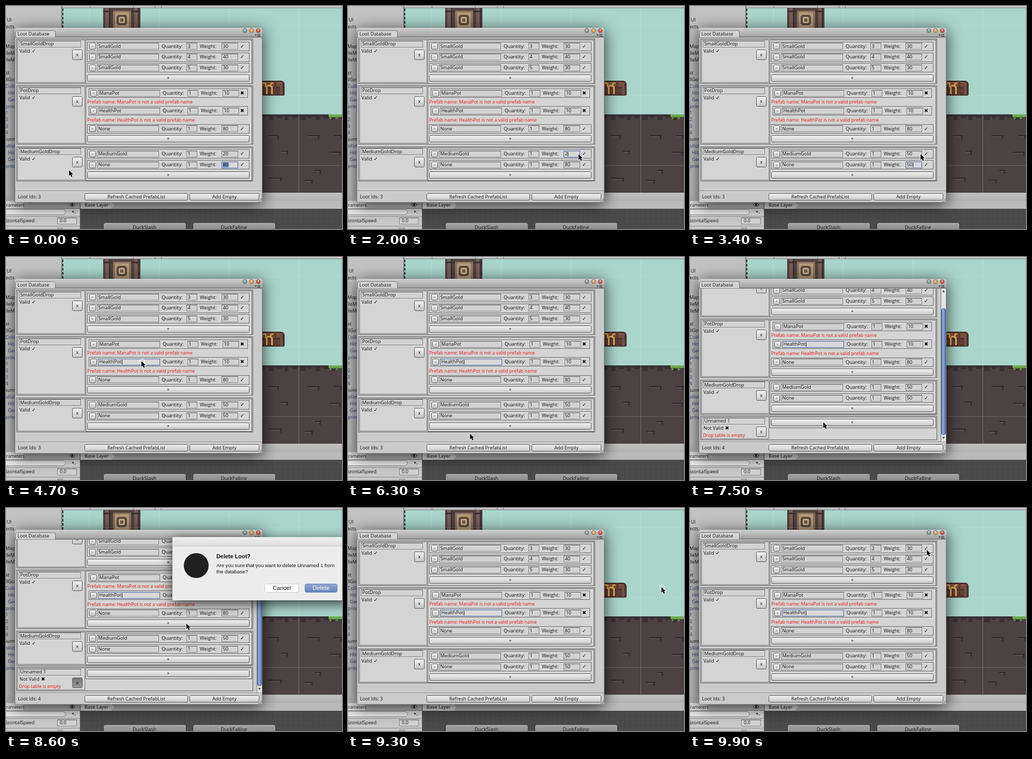
An HTML page with a canvas that plays this animation: 650 px wide and 430 px high, repeating every 10000 ms.

```html
<!DOCTYPE html>
<html>
<head>
<meta charset="utf-8">
<style>
html, body { margin: 0; width: 650px; height: 430px; overflow: hidden; }
canvas { display: block; }
</style>
</head>
<body>
<canvas id="stage" width="650" height="430"></canvas>
<script>
const c = document.getElementById('stage').getContext('2d');
const UI = '"Open Sans", sans-serif', MARK = '"DejaVu Sans", sans-serif', SYS = '"Liberation Sans", Arial, sans-serif';
const RED = '#ea1414', INK = '#121212', PANEL = '#cacaca', BOX = '#d4d4d4';

function rect(x, y, w, h, color) { c.fillStyle = color; c.fillRect(x, y, w, h); }
function frame(x, y, w, h, color) {
  c.strokeStyle = color; c.lineWidth = 1;
  c.strokeRect(Math.round(x) + .5, Math.round(y) + .5, Math.round(w) - 1, Math.round(h) - 1);
}
function text(s, x, y, { color = INK, size = 9.2, font = UI, align = 'left', weight = '' } = {}) {
  c.font = `${weight} ${size}px ${font}`;
  c.fillStyle = color; c.textAlign = align;
  c.fillText(s, x, y + 2.9);
}
function shade(y, h, ...colors) {
  const g = c.createLinearGradient(0, y, 0, y + h);
  colors.forEach((k, i) => g.addColorStop(i / (colors.length - 1), k));
  return g;
}
function round(x, y, w, h, r, fill, stroke) {
  c.beginPath(); c.roundRect(x, y, w, h, r);
  c.fillStyle = fill; c.fill();
  if (stroke) { c.strokeStyle = stroke; c.lineWidth = 1; c.stroke(); }
}
function dot(x, y, r, color) { c.beginPath(); c.arc(x, y, r, 0, 7); c.fillStyle = color; c.fill(); }
function poly(color, ...p) {
  c.beginPath();
  for (let i = 0; i < p.length; i += 2) c.lineTo(p[i], p[i + 1]);
  c.closePath(); c.fillStyle = color; c.fill();
}
function shadowed(draw, blur, dy) {
  c.save(); c.shadowColor = 'rgba(0,0,0,.75)'; c.shadowBlur = blur; c.shadowOffsetY = dy;
  draw(); c.restore();
}
function button(x, y, w, h, label, down) {
  y = Math.round(y);
  round(x + .5, y + .5, w - 1, h - 1, 2, down ? shade(y, h, '#777', '#989898') : shade(y, h, '#f2f2f2', '#dedede', '#c2c2c2'), '#5a5a5a');
  text(label, x + w / 2, y + h / 2, { align: 'center' });
}
function field(x, y, w, value, focus) {
  const top = Math.round(y - 6.5);
  rect(x, top, w, 13, focus ? '#d8d8d8' : '#d2d2d2');
  frame(x, top, w, 13, focus ? '#4664a8' : '#848484');
  if (!focus) rect(x, top, w, 1, '#505050');
  if (focus === 'all') rect(x + 2, top + 2, 12, 9, '#7089c4');
  text(value, x + 2.5, y);
  if (focus === 'caret') rect(Math.round(x + 3 + c.measureText(value).width), top + 2, 1, 9, '#111');
}

// Latest value whose start time has passed
const at = (t, steps) => steps.filter(s => s[0] <= t).pop()[1];

const path = [[0, 122, 317], [200, 122, 317], [1300, 446, 286], [3600, 446, 286], [4500, 262, 201], [5400, 262, 201],
  [6300, 236, 341], [6700, 422, 367], [7000, 422, 367], [7500, 258, 319], [7800, 138, 336], [8100, 138, 336],
  [8600, 349, 223], [9050, 609, 154], [9250, 609, 154], [9900, 458, 81], [10000, 458, 81]];
const clicks = [1500, 4600, 6900, 8000, 9200];

// Smooth curve through the path; the pointer rests where two neighbouring points agree
function pointer(t) {
  const i = path.findIndex(p => p[0] > t), a = path[i - 1], b = path[i];
  const d = b[0] - a[0], u = (t - a[0]) / d;
  const slope = (k, axis) => {
    const p = path[k - 1], q = path[k], r = path[k + 1];
    if (!p || !r || p[1] === q[1] || q[1] === r[1]) return 0;
    return (r[axis] - p[axis]) / (r[0] - p[0]) * d;
  };
  return [1, 2].map(k => a[k] + (b[k] - a[k]) * u * u * (3 - 2 * u)
    + slope(i - 1, k) * u * (1 - u) ** 2 - slope(i, k) * u * u * (1 - u));
}

function rock(x, y, w) {
  rect(x, y, w, 2, '#302a2d'); rect(x + w - 3, y, 2, 8, '#302a2d'); rect(x + 2, y + 2, w - 6, 2, '#5b4f4f');
}

function scene() {
  rect(0, 0, 650, 430, '#c2c2c2');
  rect(108, 0, 542, 360, '#a9d5cb');
  // Door
  rect(188, 4, 72, 50, '#51413f');
  for (const x of [192, 248]) { rect(x, 4, 8, 50, '#765e59'); rect(x + 7, 4, 2, 50, '#352d30'); }
  rect(188, 9, 72, 3, '#3a3033');
  rect(207, 9, 35, 33, '#8a7260'); rect(211, 12, 27, 30, '#b39b78');
  round(214, 17, 20, 20, 5, '#594941'); round(218, 21, 12, 12, 3, '#c9b188'); rect(221, 24, 6, 6, '#71594a');
  // Ground
  rect(490, 209, 160, 151, '#4c4243');
  rect(490, 209, 160, 4, '#383034');
  for (let i = 0; i < 11; i++) rect(494 + i * 15, 213, 7 + i % 3 * 2, 3 + i % 2 * 4, '#383034');
  [[508, 249, 20], [583, 249, 24], [634, 249, 16], [532, 279, 14], [626, 281, 22], [508, 331, 26], [578, 335, 16], [598, 316, 12]]
    .forEach(r => rock(...r));
  rect(624, 209, 26, 5, '#70ac4e');
  for (let x = 626; x < 650; x += 6) rect(x, 213, 4, 2 + x % 4 * 1.5, '#588e43');
  // Chest
  round(490, 144, 49, 29, [3, 7, 3, 3], '#4b302d');
  rect(492, 147, 42, 9, '#7b4a39'); rect(492, 159, 44, 10, '#643e34');
  rect(492, 147, 40, 2, '#925b43');
  rect(519, 145, 4, 27, '#573c37'); rect(530, 148, 5, 23, '#6f5147');
  for (const x of [501, 511]) { rect(x, 148, 3, 9, '#d5a24c'); rect(x + 2, 155, 3, 15, '#e4b457'); }
  rect(497, 147, 5, 3, '#e4b457'); rect(505, 152, 7, 3, '#e4b457'); rect(513, 147, 4, 3, '#d5a24c');
  for (const x of [161, 296, 431, 566]) rect(x, 4, 1, 356, 'rgba(225,240,235,.3)');
  for (const y of [37, 172, 307]) rect(108, y, 542, 1, 'rgba(225,240,235,.18)');
  rect(108, 0, 542, 4, '#c8c8c8'); rect(108, 3, 542, 1, '#777');
  for (const x of [162, 246, 288, 300]) rect(x, 0, 1, 3, '#666');
  rect(107, 0, 2, 376, '#777');
  for (let y = 5; y < 42; y += 8) rect(109, y, 2, 5, '#303030');
}

function panels() {
  const list = [[27, ' UI'], [40, 'ects'], [78, 'MapC'], [91, 'lleMa'], [104, 'lleMa'], [129, 'st'], [142, 'llGol'],
    [155, 'Collid'], [168, '  Hitb'], [181, '  Geo'], [194, 'prite'], [206, '1'], [219, '2'], [232, '3'], [244, '4'],
    [257, 'iumG'], [270, 'ollid'], [283, '  Hitb'], [296, '  Geo'], [309, 'prite']];
  for (const [y, s] of list) text(s, -1, y, { color: y < 150 || y === 257 ? INK : '#283f7b' });
  rect(0, 360, 650, 16, shade(360, 16, '#c0c0c0', '#b2b2b2'));
  rect(0, 376, 650, 15, '#bababa');
  rect(0, 376, 34, 14, '#dedede'); text('arameters', -4, 384, { size: 8.3 });
  rect(0, 390, 143, 40, '#c8c8c8'); rect(0, 390, 143, 1, '#777');
  rect(0, 391, 143, 14, '#d6d6d6');
  round(-10, 392.5, 125, 10, 5, '#e6e6e6', '#858585'); text('+.', 127, 397, { weight: 'bold' });
  rect(0, 405, 143, 1, '#8b8b8b'); rect(0, 424, 143, 1, '#8b8b8b');
  text('izontalSpeed', 0, 414); field(99, 414, 38, ' 0.0'); frame(99, 428, 11, 10, '#777');
  c.beginPath(); c.ellipse(128, 383, 5, 3, 0, 0, 7); c.strokeStyle = '#222'; c.stroke(); dot(128, 383, 2, '#222');
  rect(143, 391, 507, 39, '#4b4b4b');
  for (let x = 155; x < 650; x += 10) rect(x, 391, 1, 39, '#464646');
  for (let y = 400; y < 430; y += 10) rect(143, y, 507, 1, '#464646');
  poly('#e0e0e0', 144, 377, 203, 377, 210, 384, 203, 391, 144, 391);
  text('Base Layer', 152, 384);
  rect(143, 376, 1, 54, '#555');
  for (const [x, s] of [[188, 'DuckSlash'], [361, 'DuckFalling']]) {
    round(x + .5, 417.5, 160, 30, 4, shade(417, 22, '#a6a6a6', '#808080'), '#303030');
    text(s, x + 80, 427.5, { align: 'center', size: 9.6 });
  }
}

function row(y, [name, qty, weight, bad, focus]) {
  const dx = bad ? 2 : 0;
  frame(157 + dx * 1.5, y - 9, 314 - dx * 3, 18, '#6c6c6c');
  button(161 + dx, y - 6.5, 13, 13, '-');
  field(176 + dx, y, 120, name, focus === 'name' ? 'caret' : '');
  text('Quantity:', 301 + dx, y, { size: 9.5 });
  field(349 + dx, y, 21, qty);
  text('Weight:', 375 + dx, y);
  field(417 + dx, y, 32, weight, focus === 'name' ? '' : focus);
  text(bad ? '✖' : '✓', 457, y, { font: MARK, align: 'center', size: 9.5, color: '#000' });
}

function group(y, name, rows, pressed) {
  let ry = y + 14.8;
  const plus = rows.length ? rows.reduce((s, r) => s + (r[3] ? 34.3 : 20.7), ry) - 1.2 : y + 12.5;
  const h = Math.max(plus + 11.5 - y, 47);
  rect(20, y, 457, h, BOX);
  frame(20, y, 458, h, '#5a5a5a');
  frame(22, y + 2, 131, h - 4, '#7a7a7a');
  frame(154, y + 2, 322, plus + 11 - y - 2, '#606060');
  field(25, y + 10, 120, name);
  const ok = rows.length > 0, label = ok ? 'Valid' : 'Not Valid';
  text(label, 26, y + 24);
  text(ok ? '✓' : '✖', 29 + c.measureText(label).width, y + 24, { font: MARK, size: 9.5, color: '#000' });
  if (!ok) text('Drop table is empty', 25, y + 38, { color: RED, size: 8.9 });
  button(128, y + 20.5, 20, 20, 'x', pressed);
  for (const r of rows) {
    row(ry, r);
    if (r[3]) text(`Prefab name: ${r[0]} is not a valid prefab name`, 157, ry + 17.5, { color: RED, size: 8.9 });
    ry += r[3] ? 34.3 : 20.7;
  }
  button(157, plus - 7, 314, 14, '+');
  return y + h + 3;
}

function loot(t) {
  const added = t >= 6900 && t < 9300;
  const scroll = added ? Math.round(34 * Math.min(1, Math.max(0, (t - 7000) / 400))) : 0;
  const gold = at(t, [[0, '20'], [1900, '2'], [2100, ''], [2300, '5'], [2500, '50']]);
  const none = at(t, [[0, '80'], [3100, '5'], [3300, '50']]);
  const focus = at(t, [[0, 'none'], [1500, 'gold'], [2800, 'none'], [4600, 'pot']]);

  shadowed(() => round(17, 42, 479, 337, [5, 5, 0, 0], PANEL), 30, 5);
  round(17, 42, 479, 18, [5, 5, 0, 0], shade(42, 18, '#cecece', '#a0a0a0'));
  rect(17, 59, 479, 1, '#777');
  round(18.5, 47.5, 77, 16, [3, 3, 0, 0], '#d4d4d4', '#777');
  rect(17, 60, 479, 319, PANEL);
  text('Loot Database', 22, 54);
  [[462, '#7f9f8a'], [475, '#e4a14a'], [488, '#dc5348']].forEach(([x, k]) => {
    dot(x, 47.5, 4.3, '#5e5552'); dot(x, 47.5, 3.5, k); dot(x, 46, 1.6, 'rgba(255,255,255,.65)');
  });
  poly('#444', 481, 55, 485, 55, 483, 58);
  for (const y of [54, 56, 58]) rect(486, y, 6, 1, '#444');

  c.save();
  c.beginPath(); c.rect(17, 60, 479, 296); c.clip();
  c.save();
  c.translate(0, -scroll);
  let y = group(63, 'SmallGoldDrop', [['SmallGold', '3', '30'], ['SmallGold', '4', '40'], ['SmallGold', '5', '30']]);
  y = group(y, 'PotDrop', [['ManaPot', '1', '10', true], ['HealthPot', '1', '10', true, focus === 'pot' && 'name'], ['None', '1', '80']]);
  y = group(y, 'MediumGoldDrop', [['MediumGold', '1', gold, false, focus === 'gold' && 'caret'],
    ['None', '1', none, false, focus === 'none' && (none === '80' ? 'all' : 'caret')]]);
  if (added) group(y, 'Unnamed 1', [], t >= 8000);
  c.restore();
  if (added) {
    rect(485, 60, 11, 296, '#e4e4e4'); rect(485, 60, 1, 296, '#777');
    const bar = c.createLinearGradient(486, 0, 495, 0);
    bar.addColorStop(0, '#4f6ca6'); bar.addColorStop(.4, '#94aedb'); bar.addColorStop(1, '#4a68a4');
    round(486.5, 72 + 27 * scroll / 34, 8, 244, 4, bar, '#48659e');
    poly('#444', 488, 68, 493, 68, 490.5, 64);
    poly('#444', 488, 347, 493, 347, 490.5, 351);
  }
  c.restore();

  rect(17, 356, 479, 1, '#888'); rect(17, 357, 479, 1, '#dedede');
  text('Loot Ids: ' + (added ? 4 : 3), 23, 368);
  button(152, 361, 200, 14, 'Refresh Cached PrefabList');
  button(355, 361, 135, 14, 'Add Empty');
  frame(17, 60, 479, 319, '#858585');
  c.strokeStyle = '#666';
  for (const d of [3, 6]) { c.beginPath(); c.moveTo(494 - d, 378); c.lineTo(495, 377 - d); c.stroke(); }
}

function dialog() {
  shadowed(() => rect(322, 56, 340, 122, '#ececec'), 22, 6);
  rect(322, 56, 328, 17, shade(56, 17, '#f0f0f0', '#dedede'));
  rect(322, 73, 328, 1, '#cacaca');
  dot(368, 111, 24, '#202020');
  text('Delete Loot?', 407, 94, { font: SYS, size: 10.9, weight: 'bold', color: '#111' });
  text('Are you sure that you want to delete Unnamed 1 from', 407, 111.5, { font: SYS, size: 9.65 });
  text('the database?', 407, 123, { font: SYS, size: 9.65 });
  round(500.5, 146.5, 66, 16, 3, '#fff', '#c8c8c8');
  text('Cancel', 533.5, 155, { font: SYS, size: 11.2, align: 'center' });
  round(578.5, 146.5, 62, 16, 3, shade(146, 17, '#90a8d3', '#6482bc'), '#6580b4');
  text('Delete', 609.5, 155, { font: SYS, size: 11.4, align: 'center', color: '#fff' });
}

function cursor(t) {
  const [x, y] = pointer(t);
  const hit = clicks.find(k => t >= k && t < k + 300);
  c.save(); c.translate(x, y);
  if (hit) {
    c.beginPath(); c.arc(1, 1, 3 + (t - hit) / 50, 0, 7);
    c.strokeStyle = 'rgba(255,255,255,.75)'; c.lineWidth = 1.5; c.stroke();
  }
  const p = new Path2D('M0 0V10.5L2.5 8.2L4.4 12.4L6.4 11.5L4.6 7.5H8Z');
  c.strokeStyle = '#eee'; c.lineWidth = 1.6; c.stroke(p);
  c.fillStyle = '#000'; c.fill(p);
  c.restore();
}

function draw(now) {
  const t = Math.floor(now % 10000 / 100) * 100;
  scene();
  panels();
  loot(t);
  if (t >= 8200 && t < 9300) dialog();
  cursor(t);
  requestAnimationFrame(draw);
}
requestAnimationFrame(draw);
</script>
</body>
</html>
```
